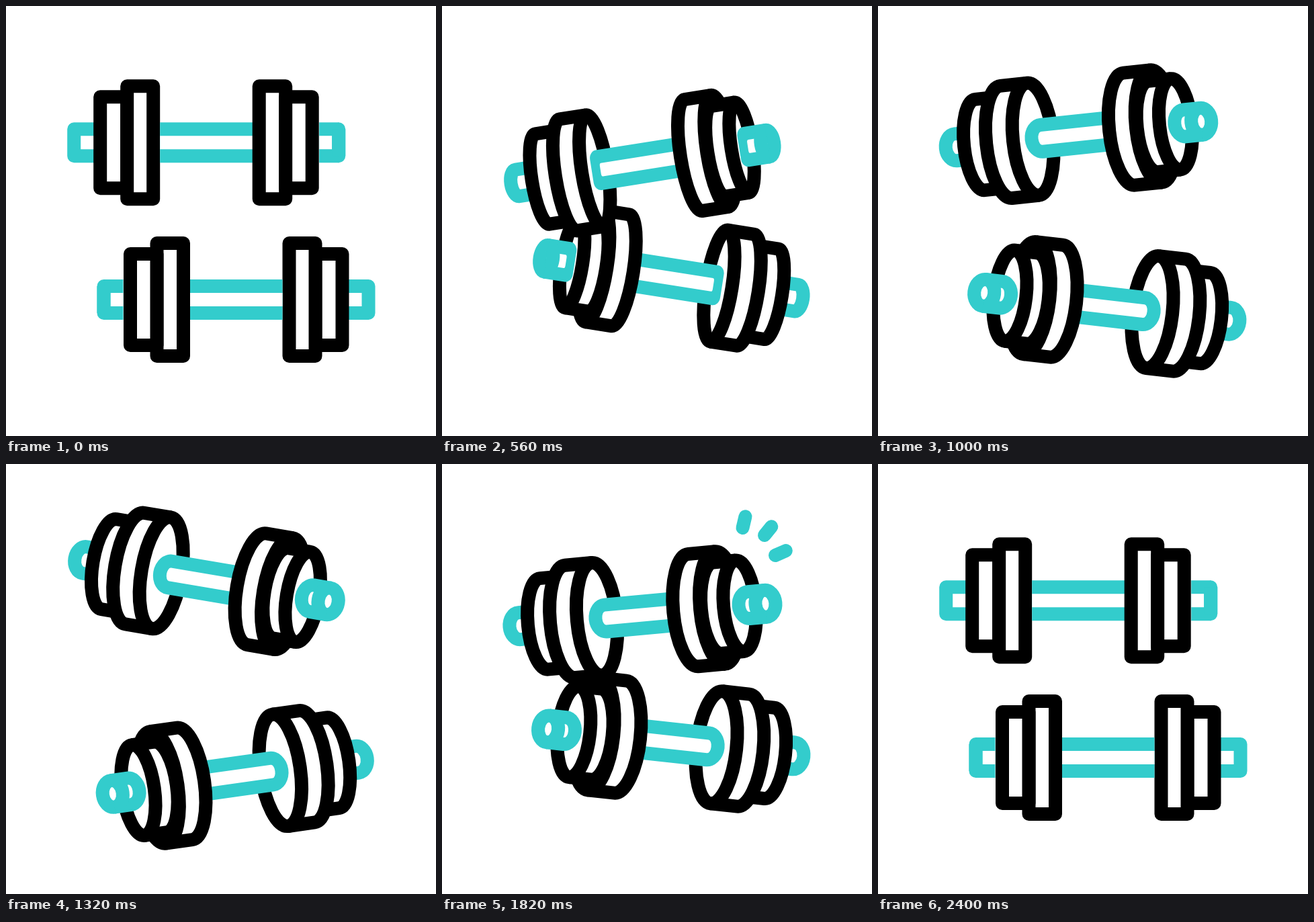
These frames come from a looping animation (640 by 640 pixels, 3000 ms). An HTML page with a canvas:

```html
<!DOCTYPE html>
<html lang="en">
<head>
<meta charset="utf-8">
<title>Dumbbells</title>
<style>
  html, body { margin: 0; width: 100%; height: 100%; overflow: hidden; background: #fff; }
  canvas { display: block; width: 640px; height: 640px; }
</style>
</head>
<body>
<canvas id="stage" width="640" height="640"></canvas>
<script>
const ctx = document.getElementById('stage').getContext('2d');
const LOOP = 3000, TEAL = '#33cccc', BLACK = '#000', WHITE = '#fff';
const TOP = -Math.PI / 2, BOTTOM = Math.PI / 2;

// Keyframes are [time, value] pairs; every segment eases in and out.
const TURN = [[200, 0], [800, 1], [1900, 1], [2400, 0]];
const LIFT = [[200, 0], [700, 38], [1200, -39], [1700, 25], [2200, 0]];
const ROLL_UPPER = [[200, 0], [800, -13.8], [1320, 9.6], [1900, -6], [2400, 0]];
const ROLL_LOWER = [[200, 0], [800, -13.8], [1320, 8], [1900, -7], [2400, 0]];
const SPARK_HEAD = [[1700, 0], [2000, 2.76]];
const SPARK_TAIL = [[1820, 0], [2120, 2.76]];
// Start point and direction of each spark.
const SPARKS = [[447.5, 95, 4, -17], [480, 106, 10.5, -13], [496, 136, 16, -7]];

const mix = (a, b, p) => a + (b - a) * p;

function valueAt(keys, t) {
  if (t <= keys[0][0]) return keys[0][1];
  for (let i = 1; i < keys.length; i++) {
    const [t0, a] = keys[i - 1], [t1, b] = keys[i];
    if (t < t1) {
      const u = (t - t0) / (t1 - t0);
      return mix(a, b, u * u * (3 - 2 * u));
    }
  }
  return keys[keys.length - 1][1];
}

// Short cylinder: outline plus the near rim of its front face.
function barrel(back, front, rx, ry, color) {
  ctx.strokeStyle = color;
  ctx.fillStyle = WHITE;
  ctx.beginPath();
  ctx.moveTo(back, -ry);
  ctx.lineTo(front, -ry);
  ctx.ellipse(front, 0, rx, ry, 0, TOP, BOTTOM);
  ctx.lineTo(back, ry);
  ctx.ellipse(back, 0, rx, ry, 0, BOTTOM, TOP + 2 * Math.PI);
  ctx.closePath();
  ctx.fill();
  ctx.stroke();
  if (rx > 0.1) {
    ctx.beginPath();
    ctx.ellipse(front, 0, rx, ry, 0, BOTTOM, TOP + 2 * Math.PI);
    ctx.stroke();
  }
}

// Filled band with rounded corners on its left side only.
function band(left, right, h, rx, ry, color) {
  ctx.fillStyle = color;
  ctx.beginPath();
  ctx.moveTo(right, -h);
  ctx.lineTo(left + rx, -h);
  ctx.ellipse(left + rx, ry - h, rx, ry, 0, TOP, -Math.PI, true);
  ctx.lineTo(left, h - ry);
  ctx.ellipse(left + rx, h - ry, rx, ry, 0, Math.PI, BOTTOM, true);
  ctx.lineTo(right, h);
  ctx.closePath();
  ctx.fill();
}

// Rod growing out of a plate face.
function rod(root, end, p) {
  const q = p * p;
  band(root - 10 * p, end, 30, 25 * q, 30 * q, TEAL);
  band(root + 10 * p, end, 10, 5 * q, 10 * q, WHITE);
}

function cap(x, rx) {
  ctx.strokeStyle = TEAL;
  ctx.fillStyle = WHITE;
  ctx.beginPath();
  ctx.ellipse(x, 0, rx, 20, 0, 0, 2 * Math.PI);
  ctx.fill();
  ctx.beginPath();
  ctx.moveTo(x - 1, -20);
  ctx.lineTo(x, -20);
  ctx.ellipse(x, 0, rx, 20, 0, TOP, BOTTOM);
  ctx.lineTo(x - 1, 20);
  ctx.stroke();
  ctx.beginPath();
  ctx.ellipse(x, 0, rx, 20, 0, BOTTOM, TOP + 2 * Math.PI);
  ctx.stroke();
}

function dumbbell(x, y, side, roll, p) {
  const big = 29.7 * p, small = 24 * p, knob = 15 * p;
  ctx.save();
  ctx.translate(x, y);
  ctx.scale(side, 1);
  ctx.rotate(roll * Math.PI / 180);
  barrel(mix(-197, -183.5, p), -140, knob, 20, TEAL);
  barrel(mix(-158, -147, p), mix(-118, -108, p), small, 68, BLACK);
  barrel(mix(-118, -108, p), mix(-79, -68, p), big, 84, BLACK);
  rod(mix(-69, -70, p), 95, p);
  barrel(mix(78.5, 76, p), mix(118, 116, p), big, 84, BLACK);
  barrel(mix(118, 112, p), mix(157.5, 145.5, p), small, 68, BLACK);
  const end = mix(197, 184, p);
  rod(mix(168, 144, p), end, p);
  cap(end, knob);
  ctx.restore();
}

function sparks(t) {
  const head = valueAt(SPARK_HEAD, t), tail = valueAt(SPARK_TAIL, t);
  if (head - tail < 0.01) return;
  ctx.strokeStyle = TEAL;
  ctx.lineCap = 'round';
  for (const [x, y, dx, dy] of SPARKS) {
    ctx.beginPath();
    ctx.moveTo(x + dx * tail, y + dy * tail);
    ctx.lineTo(x + dx * head, y + dy * head);
    ctx.stroke();
  }
  ctx.lineCap = 'butt';
}

function draw(t) {
  const p = valueAt(TURN, t), lift = valueAt(LIFT, t);
  ctx.fillStyle = WHITE;
  ctx.fillRect(0, 0, 640, 640);
  ctx.lineWidth = 20;
  ctx.lineJoin = 'round';
  dumbbell(mix(342.5, 341, p), mix(437, 435.7, p) - lift, -1, valueAt(ROLL_LOWER, t), p);
  dumbbell(298.2, 203.2 + lift, 1, valueAt(ROLL_UPPER, t), p);
  sparks(t);
}

const start = performance.now();
function tick() {
  draw((performance.now() - start) % LOOP);
  requestAnimationFrame(tick);
}
tick();
</script>
</body>
</html>
```
